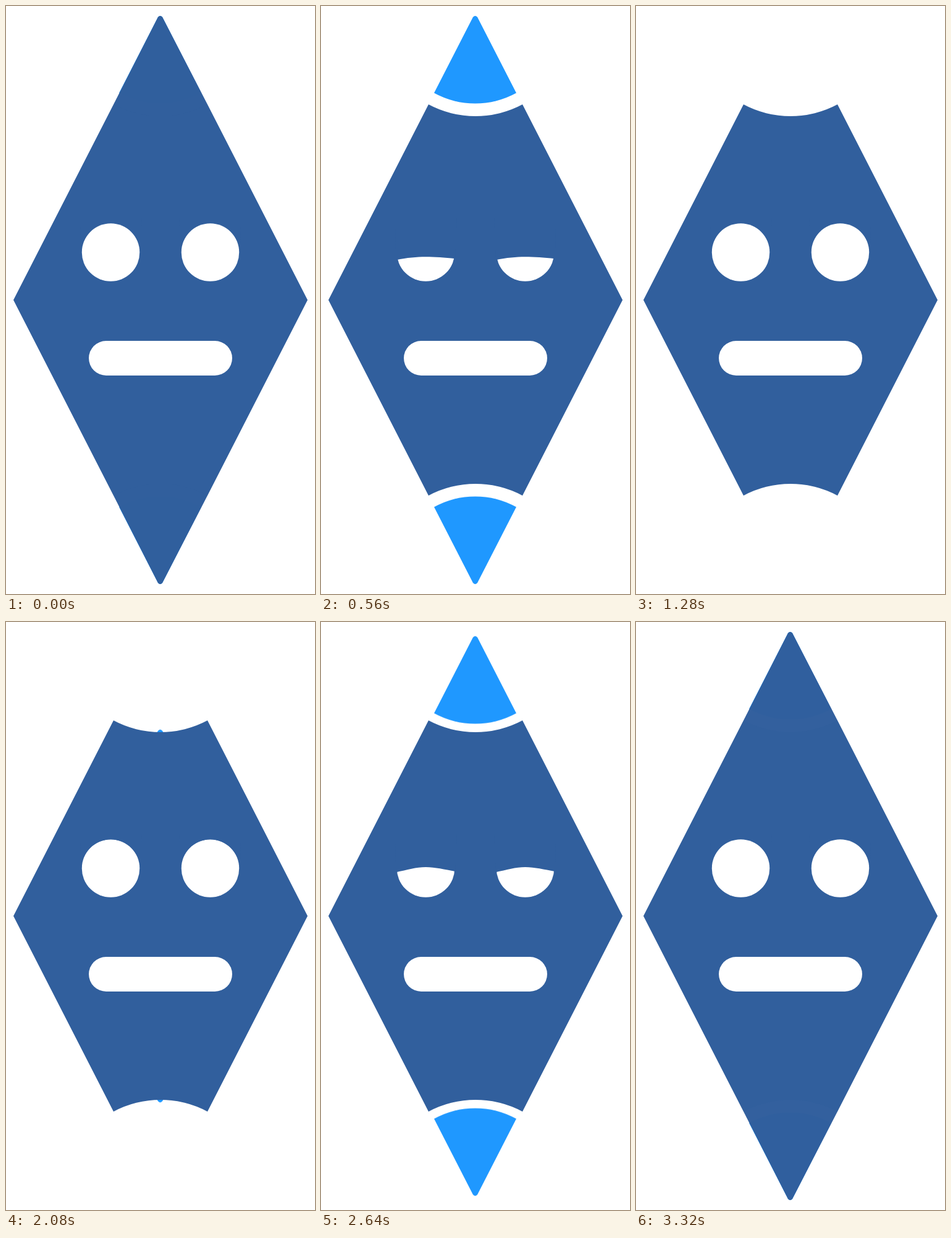
An HTML page that plays this animation: 500x950 px, repeating every 3.6 s.

```html
<!DOCTYPE html>
<html lang="en">
<head>
<meta charset="utf-8">
<title>Blinking diamond</title>
<style>
  html, body { margin: 0; width: 100%; height: 100%; overflow: hidden; background: #fff; }
  svg { display: block; width: 100vw; height: 100vh; }

  .dark { fill: #315f9d; }
  .light { fill: #1f98ff; }
  .white { fill: #fff; }

  .cover, .tip, .lid { animation: 3600ms linear infinite; }
  .cover { animation-name: cover; }
  .tip { animation-name: slide; }
  .lid {
    animation-name: blink;
    d: path("M-50 -55L50 -55L48 0C48 -26 26 -48 0 -48C-26 -48 -48 -26 -48 0Z");
  }

  /* Dark caps fade away, then return */
  @keyframes cover {
    0% { opacity: 1; animation-timing-function: ease-in-out; }
    15.556%, 78.889% { opacity: 0; animation-timing-function: ease-in-out; }
    93.333%, 100% { opacity: 1; }
  }

  /* Tips sink behind the body and come back out */
  @keyframes slide {
    0%, 15.556% { transform: translateY(0); animation-timing-function: cubic-bezier(.333, 0, .667, .333); }
    21.5% { transform: translateY(28.9px); }
    35.556%, 56.667% { transform: translateY(165.5px); }
    57.778% { transform: translateY(158px); animation-timing-function: cubic-bezier(.333, .23, .667, .55); }
    72.222% { transform: translateY(21px); }
    73.333% { transform: translateY(7px); animation-timing-function: cubic-bezier(.333, .667, .667, 1); }
    75.556%, 100% { transform: translateY(0); }
  }

  @keyframes blink {
    0%, 13.056%, 31.111%, 57.5%, 75.556%, 100% {
      d: path("M-50 -55L50 -55L48 0C48 -26 26 -48 0 -48C-26 -48 -48 -26 -48 0Z");
      animation-timing-function: ease-in;
    }
    15.556%, 60% {
      d: path("M-50 -55L50 -55L48 9.5C30 7.5 15 6.5 0 6.5C-15 6.5 -30 8 -48 11.5Z");
      animation-timing-function: ease-out;
    }
    18.056%, 26.667%, 62.5%, 71.111% {
      d: path("M-50 -55L50 -55L48 48C30 48 15 48 0 48C-15 48 -30 48 -48 48Z");
      animation-timing-function: ease-in;
    }
    28.889%, 73.333% {
      d: path("M-50 -55L50 -55L48 5C30 2.5 15 -1 0 -1C-15 -1 -30 3 -48 6.5Z");
      animation-timing-function: ease-out;
    }
  }
</style>
</head>
<body>
<svg viewBox="0 0 500 950">
  <defs>
    <path id="tip" d="M183 140.5L245.9 18Q249.5 14 253.1 18L316 140.5A138.6 138.6 0 0 1 183 140.5Z"/>
    <path id="cap" d="M174 159L245.9 18Q249.5 14 253.1 18L326 159L322 190H178Z"/>
  </defs>

  <g>
    <g class="tip light"><use href="#tip"/></g>
    <g class="cover dark"><use href="#cap"/></g>
  </g>
  <g transform="translate(0 950) scale(1 -1)">
    <g class="tip light"><use href="#tip"/></g>
    <g class="cover dark"><use href="#cap"/></g>
  </g>

  <path class="dark" d="M174 159A161.5 161.5 0 0 0 326 159L488 475L326 791A161.5 161.5 0 0 0 174 791L12 475Z"/>

  <g transform="translate(169.5 398)">
    <circle class="white" r="46.75"/>
    <path class="lid dark"/>
  </g>
  <g transform="translate(330.5 398)">
    <circle class="white" r="46.75"/>
    <path class="lid dark"/>
  </g>
  <rect class="white" x="134" y="541" width="232" height="56" rx="28"/>
</svg>
</body>
</html>
```
